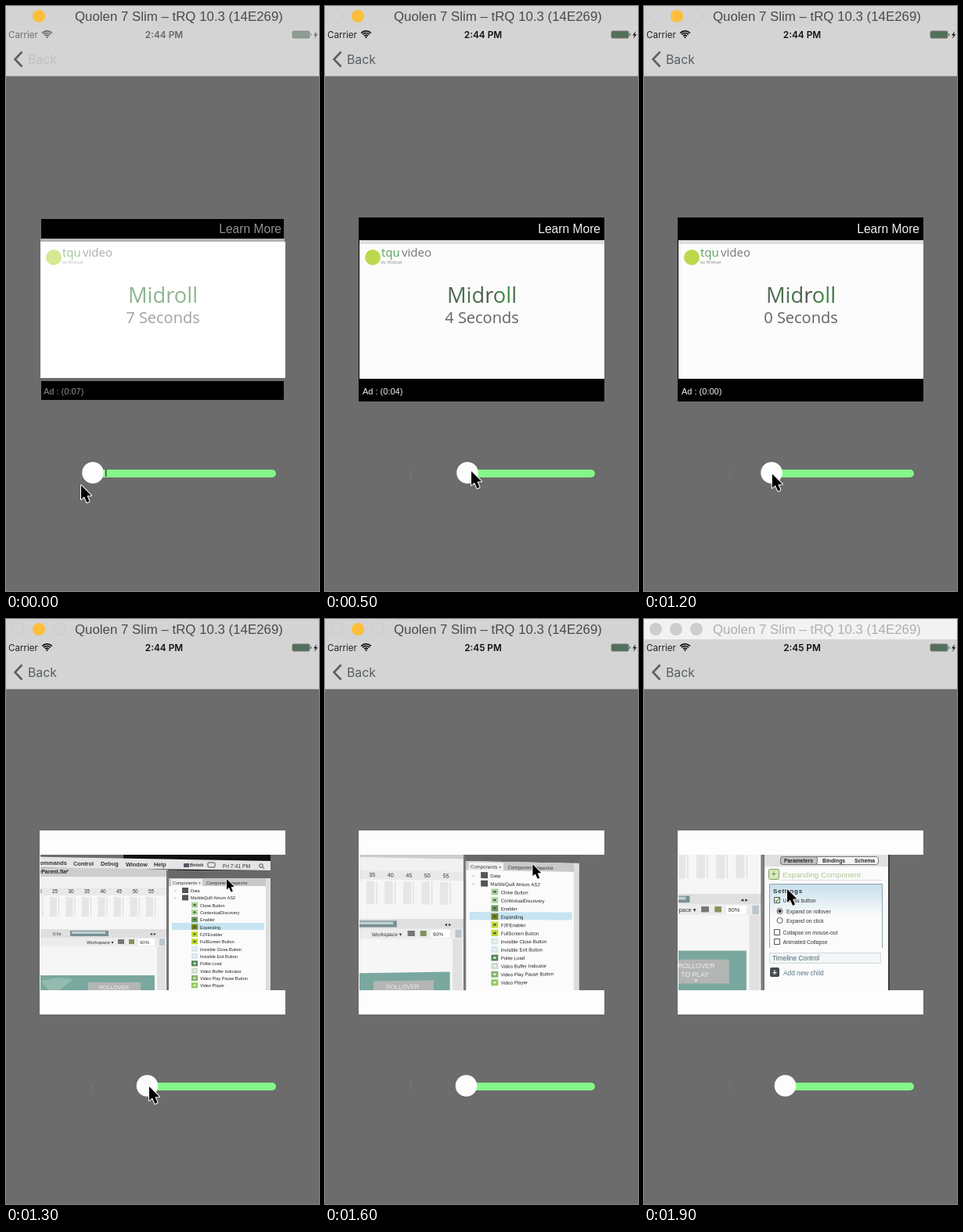
Recreate the animation shown at these times as an HTML page with a canvas. Size 400 by 747 pixels, loop 2000 ms.

```html
<!DOCTYPE html>
<html lang="en">
<head>
<meta charset="utf-8">
<title>Video ad demo</title>
<style>
html, body { margin: 0; width: 100%; height: 100%; overflow: hidden; background: #6b6c6b; }
canvas { display: block; }
</style>
</head>
<body>
<canvas id="stage" width="400" height="747"></canvas>
<script>
const ctx = document.getElementById('stage').getContext('2d');
const SANS = '"Liberation Sans", Arial, sans-serif';
const UI = 'Inter, sans-serif';
const HUMANIST = '"Open Sans", sans-serif';
const BODY = '#6b6c6b';

const lerp = (a, b, u) => a + (b - a) * u;

// Value at time t along [time, ...values] keys, eased between them.
function follow(keys, t) {
  let i = 0;
  while (i < keys.length - 2 && t >= keys[i + 1][0]) i++;
  const [a, b] = [keys[i], keys[i + 1]];
  const u = Math.min(1, Math.max(0, (t - a[0]) / (b[0] - a[0])));
  const eased = u * u * (3 - 2 * u);
  return a.slice(1).map((v, n) => lerp(v, b[n + 1], eased));
}

function rect(x, y, w, h, color) {
  ctx.fillStyle = color;
  ctx.fillRect(x, y, w, h);
}

function round(x, y, w, h, r, fill, stroke) {
  ctx.beginPath();
  ctx.roundRect(x, y, w, h, r);
  if (fill) { ctx.fillStyle = fill; ctx.fill(); }
  if (stroke) { ctx.strokeStyle = stroke; ctx.lineWidth = 1; ctx.stroke(); }
}

const disc = (x, y, r, fill, stroke) => round(x - r, y - r, 2 * r, 2 * r, r, fill, stroke);

function line(points, color, width = 1) {
  ctx.beginPath();
  points.forEach(p => ctx.lineTo(...p));
  ctx.strokeStyle = color;
  ctx.lineWidth = width;
  ctx.stroke();
}

function poly(points, color) {
  ctx.beginPath();
  points.forEach(p => ctx.lineTo(...p));
  ctx.fillStyle = color;
  ctx.fill();
}

function text(str, x, y, size, color, family = SANS, weight = 400, align = 'left') {
  ctx.font = `${weight} ${size}px ${family}`;
  ctx.textAlign = align;
  ctx.fillStyle = color;
  ctx.fillText(str, x, y);
}

function pointer(x, y, scale = 1) {
  ctx.save();
  ctx.translate(x, y);
  ctx.scale(scale, scale);
  ctx.beginPath();
  [[0, 0], [0, 18], [4, 14.5], [7.5, 22], [10.5, 20.5], [7.5, 13.5], [13, 13]]
    .forEach(p => ctx.lineTo(...p));
  ctx.closePath();
  ctx.lineJoin = 'round';
  ctx.lineWidth = 2;
  ctx.strokeStyle = '#fff';
  ctx.stroke();
  ctx.fillStyle = '#000';
  ctx.fill();
  ctx.restore();
}

function chrome(t, soft) {
  const inactive = t >= 1800;
  rect(0, 0, 400, 26, inactive ? '#f2f2f2' : '#d3d3d3');
  rect(0, 26, 400, 64, '#d4d4d4');
  rect(0, 89, 400, 1, '#a9a9a9');
  if (inactive) {
    [15, 41, 67].forEach(x => disc(x, 13, 8, '#cdcdcd'));
  } else {
    if (!soft) [15, 68].forEach(x => disc(x, 13, 7.5, null, '#cacaca'));
    disc(42, 13, 8, '#fdbe3b');
  }
  text('Quolen 7 Slim – tRQ 10.3 (14E269)', 88, 19, 16.85, inactive ? '#aeaeae' : '#4a4a4a');

  ctx.globalAlpha = soft ? 0.55 : 1;
  text('Carrier', 3, 41, 11.6, '#222', UI);
  text(t < 1400 ? '2:44 PM' : '2:45 PM', 202, 41, 11.8, '#111', UI, 600, 'center');
  ctx.lineWidth = 1.7;
  ctx.strokeStyle = '#111';
  [3.2, 6, 8.6].forEach(r => {
    ctx.beginPath();
    ctx.arc(52.5, 40.5, r, -Math.PI * 0.76, -Math.PI * 0.24);
    ctx.stroke();
  });
  disc(52.5, 40, 1.1, '#111');
  round(366, 32, 22, 9, 1.5, '#53705a', '#777');
  rect(389, 35, 1.5, 3, '#777');
  poly([[397, 32], [393, 37.5], [395.5, 37.5], [394, 42], [398.5, 36], [396, 36]], '#222');
  ctx.globalAlpha = 1;
  line([[20.5, 58.5], [11.5, 68], [20.5, 77.5]], '#5c6063', 2.6);
  ctx.globalAlpha = soft ? 0.15 : 1;
  text('Back', 28, 74, 15.8, '#565e63', UI);
  ctx.globalAlpha = 1;
}

function ad(t, soft) {
  const seconds = Math.max(0, Math.round(7 - t / 170));
  if (soft) {
    rect(45, 272, 310, 25, '#000');
    rect(45, 479, 310, 24, '#000');
    rect(44, 297, 312, 4, '#b5b5b5');
    rect(44, 301, 313, 174, '#fff');
  } else {
    rect(43, 270, 314, 235, '#000');
    rect(44, 300, 313, 176, '#fcfcfc');
    rect(44, 299, 313, 5, '#dedede');
  }
  ctx.globalAlpha = soft ? 0.6 : 1;
  text('Learn More', 352, 290, 15.6, '#f0f0f0', SANS, 400, 'right');
  text(`Ad : (0:0${seconds})`, 48, 496, 11, '#f0f0f0');

  disc(61, 321, 10, '#bcd94d');
  text('tqu', 72, 320, 15, '#58a25c', HUMANIST);
  text('video', 98, 320, 15, '#777', HUMANIST);
  text('by Wobsal', 72, 329, 5.5, '#888', HUMANIST);

  const tint = ctx.createLinearGradient(155, 0, 246, 0);
  [[0, '#55605a'], [0.35, '#477a4c'], [0.6, '#4f544f'], [0.86, '#3a953f'], [1, '#555']]
    .forEach(([at, c]) => tint.addColorStop(at, c));
  text('Midroll', 200.5, 379, 27.3, soft ? '#418345' : tint, HUMANIST, 400, 'center');
  text(`${seconds} Seconds`, 200.5, 405, 20, '#626262', HUMANIST, 400, 'center');
  ctx.globalAlpha = 1;
}

// Tilted view of a desktop: the left side fans out as tilt grows.
function desktop(tilt, withPanel) {
  const warp = (x, y) => [
    x < 205 ? 186 + (x - 186) * (1 + 0.07 * tilt) : x + 1.5 * tilt,
    y - (300 - x) * 0.048 * tilt * (402 - y) / 86
  ];
  const shape = (points, color) => poly(points.map(p => warp(...p)), color);
  const box = (x, y, w, h, color) =>
    shape([[x, y], [x + w, y], [x + w, y + h], [x, y + h]], color);
  const label = (str, x, y, size, color = '#333', weight = 400) => {
    const [px, py] = warp(x, y);
    ctx.save();
    ctx.translate(px, py);
    ctx.rotate(0.048 * tilt * (402 - y) / 86);
    text(str, 0, 0, size, color, SANS, weight);
    ctx.restore();
  };

  // Document window
  box(20, 318, 187, 200, '#f6f6f6');
  box(20, 318, 187, 11, '#cdcdcd');
  box(20, 329, 187, 14, '#f1f1f1');
  label('neParent.fla*', 37, 325, 7, '#222', 700);
  box(20, 343, 187, 10, '#e9e9e9');
  for (let n = 20; n <= 55; n += 5) {
    const x = 186 + (n - 55) * 4.1;
    label(n, x - 4, 350, 6.5, '#333');
    box(x - 7, 355, 9, 25, '#e6e6e6');
    box(x + 4, 355, 1, 25, '#dcdcdc');
  }
  box(20, 396, 187, 11, '#dfdfdf');
  label('0.0s', 60, 404, 5.5);
  box(82, 398, 49, 7, '#788f91');
  box(84, 399, 43, 3, '#bfd0d1');
  label('◂ ▸', 184, 404, 6);
  box(20, 407, 187, 11, '#ececec');
  label('Workspace ▾', 103, 415, 6);
  box(143, 409, 8, 6, '#777');
  box(157, 409, 7, 6, '#82945b');
  box(169, 408, 21, 9, '#fff');
  label('90%', 171, 415, 6);
  box(196, 408, 7, 9, '#b9c8cc');
  box(20, 455, 170, 41, '#7aa89e');
  shape([[44, 462], [66, 458], [86, 460], [60, 480]], '#94bbb0');
  box(105, 464, 67, 25, '#b3b6b4');
  label('ROLLOVER', 119, 473, 7, '#eee');
  label('TO PLAY', 122, 482, 7, '#eee');
  label('▾', 136, 488, 6, '#eee');
  box(193, 418, 11, 100, '#e1e1e1');
  box(205, 321, 2, 200, '#777');

  if (!withPanel) return;

  // Menu bar
  shape([[150, 290], [338, 290], [338, 325], [150, 318]], '#111');
  shape([[0, 303], [338, 309], [338, 321], [0, 317]], '#e5e5e5');
  [['Commands', 38, 314], ['Control', 86, 315], ['Debug', 121, 315],
   ['Window', 153, 316], ['Help', 189, 316]]
    .forEach(([s, x, y]) => label(s, x, y, 7.3, '#333', 700));
  box(227, 312, 7, 5, '#556');
  label('British', 235, 316, 5.5, '#333', 700);
  const [px, py] = warp(258, 311);
  round(px, py, 9, 6, 1, null, '#555');
  label('Fri 7:41 PM', 277, 318, 6.8, '#333');
  const [mx, my] = warp(326, 315);
  disc(mx, my, 2.3, null, '#444');
  line([[mx + 2, my + 2], [mx + 4, my + 4]], '#444');

  // Component list
  box(207, 321, 131, 10, '#686868');
  box(208, 331, 130, 150, '#fbfbfb');
  box(208, 331, 130, 10, '#c9c9c9');
  box(211, 332, 40, 9, '#f2f2f2');
  label('Components ×', 213, 339, 5.5);
  label('Component Inspector', 256, 339, 5.5);
  box(212, 388, 118, 9, '#c6e4f1');
  const rows = ['Data', 'MarbleQuill Atrium AS2', 'Close Button', 'ContextualDiscovery', 'Enabler',
    'Expanding', 'F2FEnabler', 'FullScreen Button', 'Invisible Close Button', 'Invisible Exit Button',
    'Polite Load', 'Video Buffer Indicator', 'Video Play Pause Button', 'Video Player'];
  const icons = ['#555', '#555', '#a9cf9c', '#b5d7a8', '#6d9d62', '#75851f', '#c6dc36', '#b9d832',
    '#d6e6ee', '#d6e6ee', '#57865a', '#cfdacf', '#86b26a', '#93c95e'];
  rows.forEach((name, i) => {
    const y = 347 + i * 9.33;
    const x = i < 2 ? 236 : 248;
    box(x - 11, y - 4, 8, 7, icons[i]);
    if (i < 2) label('▿', 215, y + 2, 5, '#888');
    else box(x - 8.5, y - 1.5, 3, 2, i < 8 ? '#3b5a35' : '#f4f4f4');
    label(name, x, y + 2, 5.5, '#222');
  });
  box(332, 331, 6, 150, '#ddd');
  const tip = [lerp(282, 289, tilt), lerp(332, 334, tilt)];
  pointer(...tip, 0.75);
}

function inspector(u) {
  const right = lerp(320, 313, u) - u;
  ctx.save();
  ctx.translate(u, -20 * u);
  rect(151, 301, 2, 220, '#777');
  rect(153, 301, right - 153, 220, '#fbfbfb');
  rect(right - 1, 301, 2, 220, '#3b3b3b');
  rect(159, 305, 11, 10, '#63813f');
  rect(162, 308, 5, 4, '#2b391d');
  text('Expanding', 176, 313, 6.8, '#333');
  text('★', 299, 315, 10, '#7d8a4c', '"DejaVu Sans", sans-serif');
  rect(153, 318, right - 154, 18, '#e0e0e0');
  round(173.5, 323.5, 125, 10, 3, '#f4f4f4', '#777');
  round(173.5, 323.5, 47, 10, 3, '#c2c2c2', '#777');
  [['Parameters', 178], ['Bindings', 227], ['Schema', 268]]
    .forEach(([s, x]) => text(s, x, 331, 6.8, '#222', SANS, 700));

  round(158.5, 339.5, 13, 13, 2, '#d6e8bf', '#7f9f64');
  text('+', 162, 349, 10, '#5b7a40');
  text('Expanding Component', 176, 350, 9.8, '#b1c795');
  line([[175, 353.5], [right - 8, 353.5]], '#ddd');

  const sky = ctx.createLinearGradient(0, 358, 0, 400);
  sky.addColorStop(0, '#c6dfec');
  sky.addColorStop(1, '#fbfbfb');
  rect(159, 358, right - 168, 82, sky);
  line([[159.5, 440], [159.5, 358.5], [right - 8.5, 358.5], [right - 8.5, 440]], '#8fa4ad');
  ctx.letterSpacing = '0.8px';
  text('Settings', 164, 370, 8, '#263238', SANS, 700);
  ctx.letterSpacing = '0px';
  [['Use as button', 379], ['Collapse on mouse-out', 420], ['Animated Collapse', 432]]
    .forEach(([s, y], i) => {
      round(165.5, y - 3.5, 7, 7, 0, '#fff', '#555');
      if (!i) line([[167, y], [168.5, y + 2], [172, y - 3]], '#4f8f3a', 1.3);
      text(s, 176.5, y + 2.5, 6.8, '#333');
    });
  [['Expand on rollover', 393], ['Expand on click', 405]].forEach(([s, y], i) => {
    disc(172.5, y, 3.5, '#fff', '#555');
    if (!i) disc(172.5, y, 2, '#111');
    text(s, 181, y + 2.5, 6.8, '#333');
  });
  round(159.5, 446.5, right - 170, 13, 0, '#f3f6f8', '#cfd8dc');
  text('Timeline Control', 163, 456, 8.3, '#4d6672');
  round(160, 465, 12, 12, 2, '#454b4e');
  text('+', 163, 474.5, 10, '#fff', SANS, 700);
  text('Add new child', 177, 475, 8.3, '#5d7886');
  pointer(182, 365, 0.95);
  ctx.restore();
}

function video(t) {
  rect(43, 270, 314, 235, '#fdfdfd');
  rect(44, 301, 313, 173, BODY);
  ctx.save();
  ctx.beginPath();
  ctx.rect(44, 301, 313, 173);
  ctx.clip();

  const showInspector = t >= 1700;
  const u = (t - 1700) / 200;
  let zoom = 1, x = 186, y = 348, tilt = Math.min(1, (t - 1300) / 200);
  if (showInspector) {
    [zoom, x, y, tilt] = [1.23, 124 + 2 * u, 312 - 20 * u, 0];
  } else if (t > 1500) {
    [zoom, x, y, tilt] = [1.11, 155, 330, 0.5];
  }
  ctx.save();
  ctx.translate(x, y);
  ctx.scale(zoom, zoom);
  ctx.translate(-186, -348);
  desktop(tilt, !showInspector);
  ctx.restore();
  if (showInspector) inspector(u);
  ctx.restore();
}

const knobPath = [[0, 111], [150, 111], [500, 182], [600, 182], [900, 113], [1000, 113], [1300, 180.5]];
const pointerPath = [[0, 96, 612], [150, 114, 599], [500, 187, 594], [600, 187, 594],
  [900, 107, 600], [1000, 109, 599], [1300, 183, 597]];

function slider(t) {
  const [x] = follow(knobPath, t);
  line([[109.5, 592], [109.5, 602]], '#7b7c7b');
  round(x, 592, 345 - x, 10, 5, '#85f78a');
  if (t < 100) rect(127, 592, 1.5, 9, '#444');
  disc(x, 596, 13.8, '#fdfdfd');
  if (t < 1400) pointer(...follow(pointerPath, t));
}

function draw() {
  const t = Math.floor(performance.now() % 2000 / 100) * 100;
  const soft = t < 100;
  rect(0, 0, 400, 747, BODY);
  chrome(t, soft);
  if (t < 1300) ad(t, soft);
  else video(t);
  slider(t);
  requestAnimationFrame(draw);
}
draw();
</script>
</body>
</html>
```
